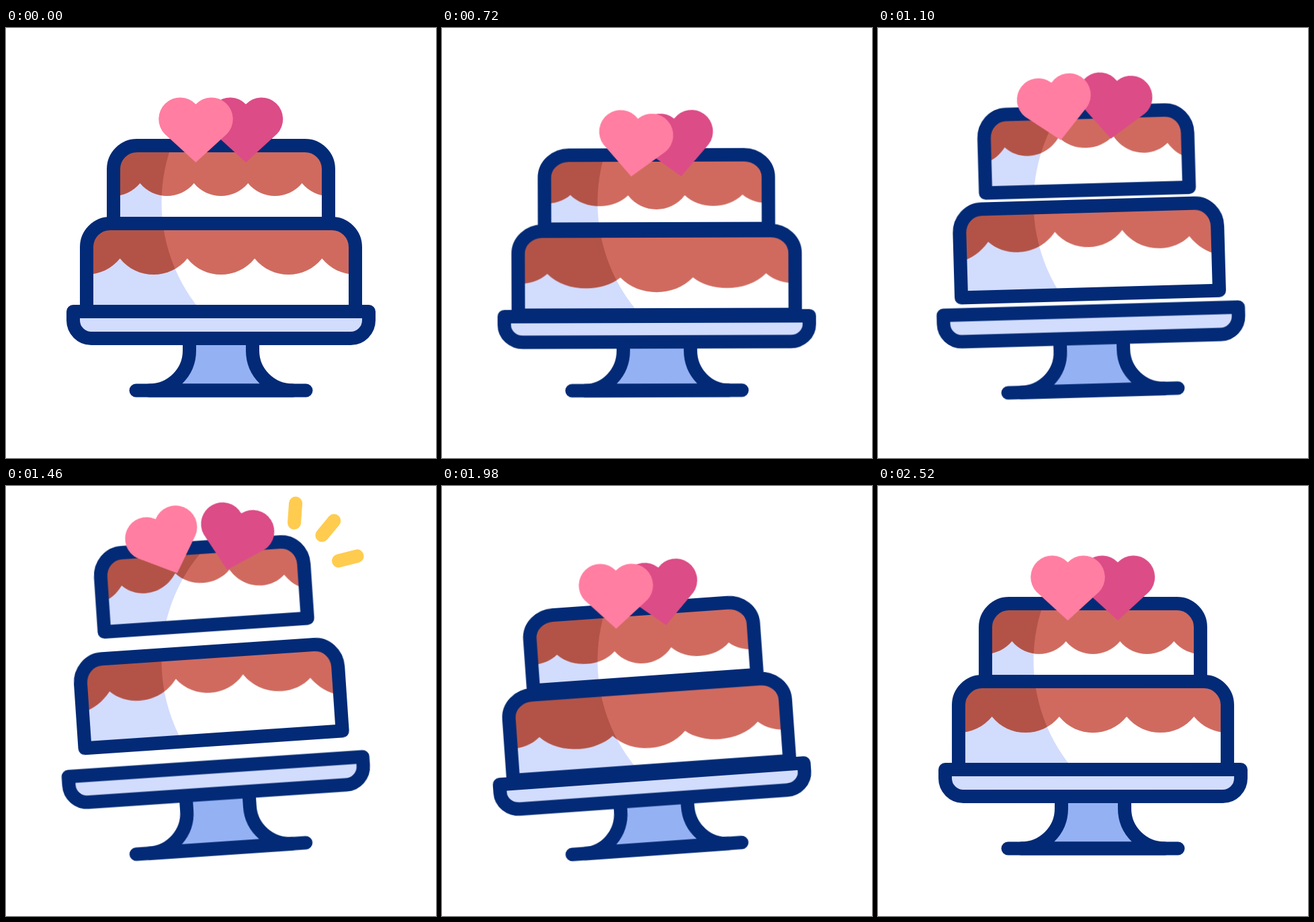
Write an HTML page without scripts that moves like this. It is 640 px wide and 640 px high and loops after 3 s.

```html
<!DOCTYPE html>
<html lang="en">
<head>
<meta charset="utf-8">
<title>Hopping cake</title>
<style>
  html, body { margin: 0; width: 100%; height: 100%; overflow: hidden; background: #fff; }
  svg { display: block; width: 100%; height: 100%; }

  svg * {
    animation-duration: 3s;
    animation-iteration-count: infinite;
    animation-timing-function: cubic-bezier(.37, 0, .63, 1);
  }

  .line { fill: none; stroke: #032a76; stroke-width: 20; stroke-linejoin: round; stroke-linecap: round; vector-effect: non-scaling-stroke; }
  .cream { fill: #fff; }
  .icing { fill: #d06a5f; }
  .shade .cream { fill: #d2dcfd; }
  .shade .icing { fill: #b35347; }

  .spin { transform-origin: 320px 539.5px; animation-name: spin; }
  .part { animation-name: hop, squish; }
  .icing, .stem { animation-name: drip; }

  .plate { --down: 6.5px; --up: -4.5px; --squash: 1.032 .96; --thin: .998 1; transform-origin: 320px 442px; }
  .lower { --down: 7px; --up: -45px; --squash: 1.031 .955; --thin: .96 1; transform-origin: 320px 422px; }
  .upper { --down: 11.5px; --up: -85px; --squash: 1.042 .948; --thin: .947 1; transform-origin: 320px 291px; }

  .lower .cream, .lower .line { d: path("M120 422V326A35 35 0 0 1 155 291H485A35 35 0 0 1 520 326V422Z"); }
  .upper .cream, .upper .line { d: path("M160 291V210A35 35 0 0 1 195 175H445A35 35 0 0 1 480 210V291Z"); }

  .lower .icing {
    --rest: path("M120 367C139 367 157.6 358 169.7 343C195 375 244 375 269.9 343C295.5 375 344.5 375 370.1 343C396 375 445 375 470.3 343C482.4 358 501 367 520 367V326A35 35 0 0 0 485 291H155A35 35 0 0 0 120 326Z");
    --sag: path("M120 373C135 373 150 369 162 357.5C189 387 241 387 267.6 363.8C294 394.3 346 394.3 372.4 363.8C399 387 451 387 478 357.5C490 369 505 373 520 373V326A35 35 0 0 0 485 291H155A35 35 0 0 0 120 326Z");
    --lift: path("M120 368C137 365 152 355 164 340C190 364 241 364 267.8 328C294 360 346 360 372.2 328C399 364 450 364 476 340C488 355 503 365 520 368V326A35 35 0 0 0 485 291H155A35 35 0 0 0 120 326Z");
  }
  .upper .icing {
    --rest: path("M160 250C175 250 189.5 243 199.5 231C220 256.3 259.3 256.3 279.8 231C300.3 256.3 339.7 256.3 360.2 231C380.7 256.3 420 256.3 440.5 231C450.5 243 465 250 480 250V210A35 35 0 0 0 445 175H195A35 35 0 0 0 160 210Z");
    --sag: path("M160 251C174 251 187 247 197 237.5C218 261 258.5 261 279.5 238.5C300 268 340 268 360.5 238.5C381.5 261 422 261 443 237.5C453 247 466 251 480 251V210A35 35 0 0 0 445 175H195A35 35 0 0 0 160 210Z");
    --lift: path("M160 246C173 243 183 236 192 224C213 244 255.5 244 277.3 211C299 233.7 341 233.7 362.7 211C384.5 244 427 244 448 224C457 236 467 243 480 246V210A35 35 0 0 0 445 175H195A35 35 0 0 0 160 210Z");
  }
  .stem {
    --rest: path("M273 455V480C273 513 246 539.5 213 539.5H427C394 539.5 367 513 367 480V455Z");
    --sag: path("M270 455V480C270 513 244 539.5 213 539.5H427C396 539.5 370 513 370 480V455Z");
    --lift: var(--rest);
    fill: #94b1f4;
  }

  .heart { animation-name: sway; }
  .pink { --turn: 1deg; fill: #ff7ea1; transform-origin: 282.5px 200px; }
  .rose { --turn: -1deg; fill: #dc4c87; transform-origin: 357px 200px; }

  .spark { stroke: #ffcc50; stroke-width: 20; stroke-linecap: round; opacity: 0; animation-name: spark; animation-timing-function: linear; }

  @keyframes spin {
    0%, 18% { transform: rotate(0deg); animation-timing-function: cubic-bezier(.33, 0, .67, .33); }
    36.67% { transform: rotate(-1.6deg); animation-timing-function: linear; }
    48.67% { transform: rotate(-3.85deg); animation-timing-function: cubic-bezier(.33, .5, .67, 1); }
    58% { transform: rotate(-5.1deg); }
    84.67%, 100% { transform: rotate(0deg); }
  }
  @keyframes hop {
    0%, 2% { translate: 0 0; }
    20.67% { translate: 0 var(--down); }
    48% { translate: 0 var(--up); }
    71% { translate: 0 var(--down); }
    84.67%, 100% { translate: 0 0; }
  }
  @keyframes squish {
    0%, 2% { scale: 1 1; }
    21.33%, 23.33% { scale: var(--squash); }
    36.33%, 50% { scale: var(--thin); }
    65.67%, 71.33% { scale: var(--squash); }
    84.67%, 100% { scale: 1 1; }
  }
  @keyframes drip {
    0%, 2% { d: var(--rest); }
    21.33%, 23.33% { d: var(--sag); }
    36.33%, 50% { d: var(--lift); }
    65.67%, 71.33% { d: var(--sag); }
    84.67%, 100% { d: var(--rest); }
  }
  @keyframes sway {
    0%, 6% { transform: translateY(0) rotate(0deg); }
    22.67% { transform: translateY(21.5px) rotate(calc(var(--turn) * 7)); }
    48% { transform: translateY(-74px) rotate(calc(var(--turn) * -18)); }
    71.67% { transform: translateY(21.5px) rotate(calc(var(--turn) * 7)); }
    84.67%, 100% { transform: translateY(0) rotate(0deg); }
  }
  @keyframes spark {
    0%, 41.32% { opacity: 0; stroke-dasharray: 0 200; stroke-dashoffset: 0; }
    41.33% { opacity: 1; stroke-dasharray: 0 200; stroke-dashoffset: 0; }
    48.67% { opacity: 1; stroke-dasharray: 56 200; stroke-dashoffset: -29; }
    54% { opacity: 1; stroke-dasharray: 37 200; stroke-dashoffset: -60; }
    58% { opacity: 1; stroke-dasharray: 0 200; stroke-dashoffset: -99; }
    58.01%, 100% { opacity: 0; stroke-dasharray: 0 200; stroke-dashoffset: -99; }
  }
</style>
</head>
<body>
<svg viewBox="0 0 640 640">
  <defs>
    <clipPath id="shadow">
      <path clip-rule="evenodd" d="M0 0H640V640H0ZM231.5 260a250 250 0 0 0 500 0a250 250 0 0 0 -500 0Z"/>
    </clipPath>
  </defs>

  <g class="spin">
    <path class="line stem"/>
    <path class="line" d="M193.5 539.5H446.5"/>
    <g class="part plate">
      <path class="line" style="fill:#d2dcfd" d="M100 422H540V435A27 27 0 0 1 513 462H127A27 27 0 0 1 100 435Z"/>
    </g>
    <g class="part lower"><path class="cream"/><path class="icing"/></g>
    <g class="part upper"><path class="cream"/><path class="icing"/></g>
  </g>

  <!-- The shadow edge stays still while the cake moves through it -->
  <g class="shade" clip-path="url(#shadow)">
    <g class="spin">
      <g class="part lower"><path class="cream"/><path class="icing"/></g>
      <g class="part upper"><path class="cream"/><path class="icing"/></g>
    </g>
  </g>

  <g class="spin">
    <g class="part lower"><path class="line"/></g>
    <g class="part upper"><path class="line"/></g>
    <path class="heart rose" d="M357 200L310.5 157.5A32 32 0 0 1 357 113.5A32 32 0 0 1 403.5 157.5Z"/>
    <path class="heart pink" d="M282.5 200L236 157.5A32 32 0 0 1 282.5 113.5A32 32 0 0 1 329 157.5Z"/>
  </g>

  <path class="spark" pathLength="100" d="M428 70L431.6 18"/>
  <path class="spark" pathLength="100" d="M461 84.5L493 46"/>
  <path class="spark" pathLength="100" d="M480.5 115L530 102.5"/>
</svg>
</body>
</html>
```
